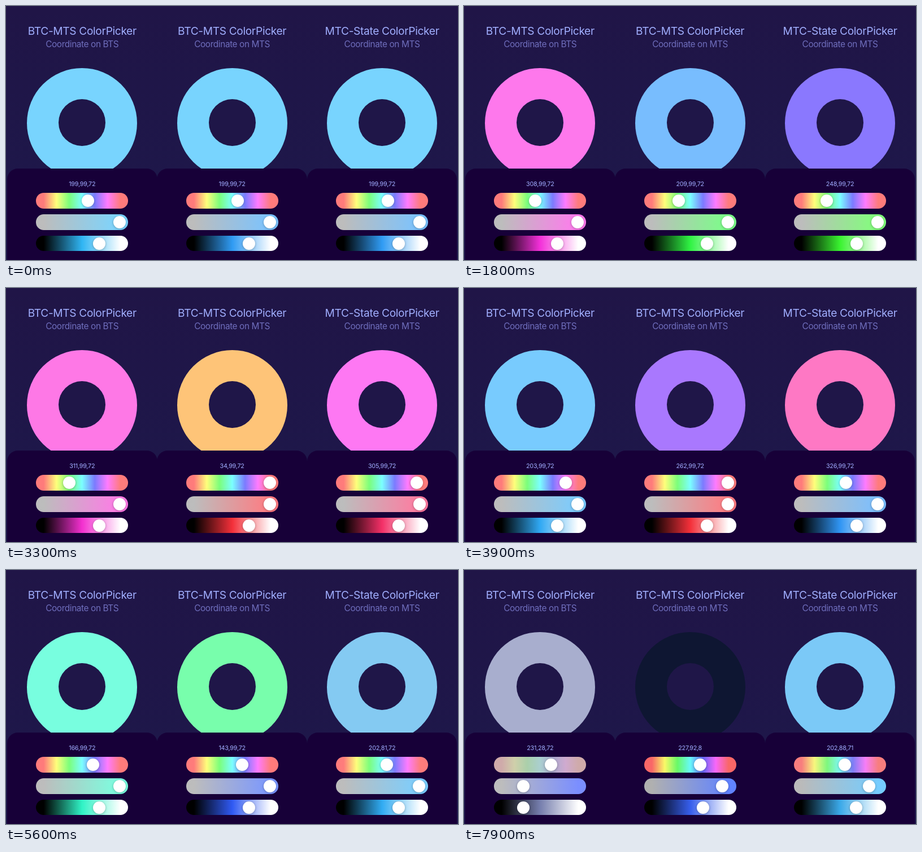
Recreate the animation shown at these times as an HTML page without scripts. Size 800 px wide and 450 px high, loop 8 s.

```html
<!DOCTYPE html>
<html lang="en">
<head>
<meta charset="utf-8">
<title>Colour pickers</title>
<style>
/* shown colour: h s l; knob values: kh ks kl */
@property --h { syntax: "<integer>"; inherits: true; initial-value: 199; }
@property --s { syntax: "<integer>"; inherits: true; initial-value: 99; }
@property --l { syntax: "<integer>"; inherits: true; initial-value: 72; }
@property --kh { syntax: "<integer>"; inherits: true; initial-value: 207; }
@property --ks { syntax: "<integer>"; inherits: true; initial-value: 99; }
@property --kl { syntax: "<integer>"; inherits: true; initial-value: 72; }

html, body { margin: 0; width: 100%; height: 100%; overflow: hidden; }
body {
  position: relative;
  background: linear-gradient(#201547, #1d184b);
  font-family: Inter, Roboto, sans-serif;
  text-align: center;
}
.picker {
  position: absolute; top: 0; width: 265.5px; height: 450px;
  /* tracks follow the knobs */
  --th: var(--kh);
  --ts: calc(var(--ks) * 1%);
  --tl: calc(var(--kl) * 1% + 2%);
  animation: 8s linear infinite;
}
.one {
  left: 2px; animation-name: one;
  /* tracks follow the shown colour */
  --th: var(--h);
  --ts: calc(var(--s) * 1%);
  --tl: calc(var(--l) * 1% + 2%);
}
.two { left: 267.4px; animation-name: two; }
.three { left: 532.8px; animation-name: three; }

h1, h2, .value {
  position: absolute; left: 0; width: 100%; margin: 0;
  font-weight: 400; white-space: nowrap;
}
h1 { top: 32px; font-size: 19.2px; line-height: 24px; letter-spacing: -.37px; color: #a1afff; }
h2 { top: 57.6px; font-size: 15.4px; line-height: 20px; letter-spacing: -.4px; color: #6f6ebd; }

.disc {
  position: absolute; left: 35.4px; top: 109.7px; width: 195px; height: 195px;
  border-radius: 50%;
  background: color-mix(in srgb, #fff 5%, hsl(var(--h), calc(var(--s) * 1%), calc(var(--l) * 1%)));
}
.disc::after {
  content: ""; position: absolute; left: 56px; top: 55px; width: 83px; height: 83px;
  border-radius: 50%; background: #1f1648;
}
.panel {
  position: absolute; left: 0; top: 288px; width: 100%; height: 162px;
  border-radius: 19px 19px 0 0; background: #170038;
}
.value { top: 21px; font-size: 10.8px; line-height: 14px; letter-spacing: -.25px; color: #a1afff; }
.value::before {
  counter-reset: h var(--h) s var(--s) l var(--l);
  content: counter(h) "," counter(s) "," counter(l);
}
.track {
  position: absolute; left: 51.3px; width: 163px; height: 27.6px; border-radius: 13.8px;
  --from: 13.7px;
  --to: calc(100% - 13.7px);
}
.track::after {
  content: ""; position: absolute; left: calc(2.7px + var(--x)); top: 2.8px;
  width: 22px; height: 22px; border-radius: 50%;
  background: #fff; box-shadow: 0 1px 4px rgba(0, 0, 0, .28);
}
.hue {
  top: 43.3px;
  --x: calc(var(--kh) * .3764px);
  background: linear-gradient(90deg,
    hsl(0, var(--ts), var(--tl)) var(--from), hsl(60, var(--ts), var(--tl)),
    hsl(120, var(--ts), var(--tl)), hsl(180, var(--ts), var(--tl)),
    hsl(240, var(--ts), var(--tl)), hsl(300, var(--ts), var(--tl)),
    hsl(360, var(--ts), var(--tl)) var(--to));
}
.sat {
  top: 81.2px;
  --x: calc(var(--ks) * 1.355px);
  background: linear-gradient(90deg,
    hsl(var(--th), 0%, var(--tl)) var(--from), hsl(var(--th), 100%, var(--tl)) var(--to));
}
.light {
  top: 118.8px;
  --x: calc(var(--kl) * 1.355px);
  background: linear-gradient(90deg,
    #000 var(--from), hsl(var(--th), calc(var(--ts) * .9), 57%), #fff var(--to));
}

/* every step lasts 100 ms */
@keyframes one {
  0% { --h: 199; --s: 99; --l: 72; --kh: 207; --ks: 99; --kl: 72; animation-timing-function: steps(9); }
  11.25% { --h: 215; --kh: 308; animation-timing-function: steps(9); }
  22.5% { --h: 308; --kh: 157; animation-timing-function: steps(6); }
  30% { --h: 200; --kh: 311; animation-timing-function: steps(9); }
  41.25% { --h: 311; --kh: 120; animation-timing-function: steps(7); }
  50% { --h: 185; --kh: 330; animation-timing-function: steps(6); }
  57.5% { --h: 327; --kh: 172; animation-timing-function: steps(5); }
  63.75% { --h: 250; --kh: 120; animation-timing-function: steps(5); }
  70% { --h: 166; --s: 99; --kh: 231; --ks: 99; animation-timing-function: steps(5); }
  76.25% { --h: 231; --s: 60; --ks: 5; animation-timing-function: steps(5); }
  82.5% { --s: 5; --ks: 51; animation-timing-function: steps(6); }
  90% { --s: 51; --l: 72; --ks: 28; --kl: 72; animation-timing-function: steps(7); }
  98.75%, 100% { --h: 231; --s: 28; --l: 72; --kh: 231; --ks: 28; --kl: 28; }
}
@keyframes two {
  0% { --h: 199; --s: 99; --l: 72; --kh: 207; --ks: 99; --kl: 72; animation-timing-function: steps(9); }
  11.25% { --h: 300; --kh: 340; animation-timing-function: steps(9); }
  22.5% { --h: 209; --kh: 126; animation-timing-function: steps(6); }
  30% { --h: 100; --kh: 5; animation-timing-function: steps(9); }
  41.25% { --h: 34; --kh: 357; animation-timing-function: steps(7); }
  50% { --h: 300; --kh: 357; animation-timing-function: steps(6); }
  57.5% { --h: 360; --kh: 194; animation-timing-function: steps(5); }
  63.75% { --h: 250; --kh: 143; animation-timing-function: steps(5); }
  70% { --h: 143; --s: 99; --kh: 227; --ks: 99; animation-timing-function: steps(5); }
  76.25% { --h: 227; --s: 80; --ks: 26; animation-timing-function: steps(5); }
  82.5% { --s: 26; --l: 72; --ks: 18; --kl: 72; animation-timing-function: steps(6); }
  90% { --s: 85; --l: 72; --ks: 92; --kl: 8; animation-timing-function: steps(7); }
  98.75%, 100% { --h: 227; --s: 92; --l: 8; --kh: 227; --ks: 92; --kl: 67; }
}
@keyframes three {
  0% { --h: 199; --s: 99; --l: 72; --kh: 207; --ks: 99; --kl: 72; animation-timing-function: steps(9); }
  11.25% { --h: 290; --kh: 330; animation-timing-function: steps(9); }
  22.5% { --h: 248; --kh: 117; animation-timing-function: steps(6); }
  30% { --h: 130; --kh: 20; animation-timing-function: steps(9); }
  41.25% { --h: 305; --kh: 343; animation-timing-function: steps(7); }
  50% { --h: 330; --kh: 187; animation-timing-function: steps(6); }
  57.5% { --h: 187; --s: 99; --kh: 202; --ks: 99; animation-timing-function: steps(5); }
  63.75% { --h: 202; --s: 99; --ks: 81; animation-timing-function: steps(5); }
  70% { --s: 81; --ks: 98; animation-timing-function: steps(5); }
  76.25% { --s: 60; --ks: 14; animation-timing-function: steps(5); }
  82.5% { --s: 14; --ks: 58; animation-timing-function: steps(6); }
  90% { --s: 58; --l: 72; --ks: 88; --kl: 72; animation-timing-function: steps(7); }
  98.75%, 100% { --h: 202; --s: 88; --l: 71; --kh: 202; --ks: 88; --kl: 71; }
}
</style>
</head>
<body>
<section class="picker one">
  <h1>BTC-MTS ColorPicker</h1>
  <h2>Coordinate on BTS</h2>
  <div class="disc"></div>
  <div class="panel">
    <div class="value"></div>
    <div class="track hue"></div>
    <div class="track sat"></div>
    <div class="track light"></div>
  </div>
</section>
<section class="picker two">
  <h1>BTC-MTS ColorPicker</h1>
  <h2>Coordinate on MTS</h2>
  <div class="disc"></div>
  <div class="panel">
    <div class="value"></div>
    <div class="track hue"></div>
    <div class="track sat"></div>
    <div class="track light"></div>
  </div>
</section>
<section class="picker three">
  <h1>MTC-State ColorPicker</h1>
  <h2>Coordinate on MTS</h2>
  <div class="disc"></div>
  <div class="panel">
    <div class="value"></div>
    <div class="track hue"></div>
    <div class="track sat"></div>
    <div class="track light"></div>
  </div>
</section>
</body>
</html>
```
